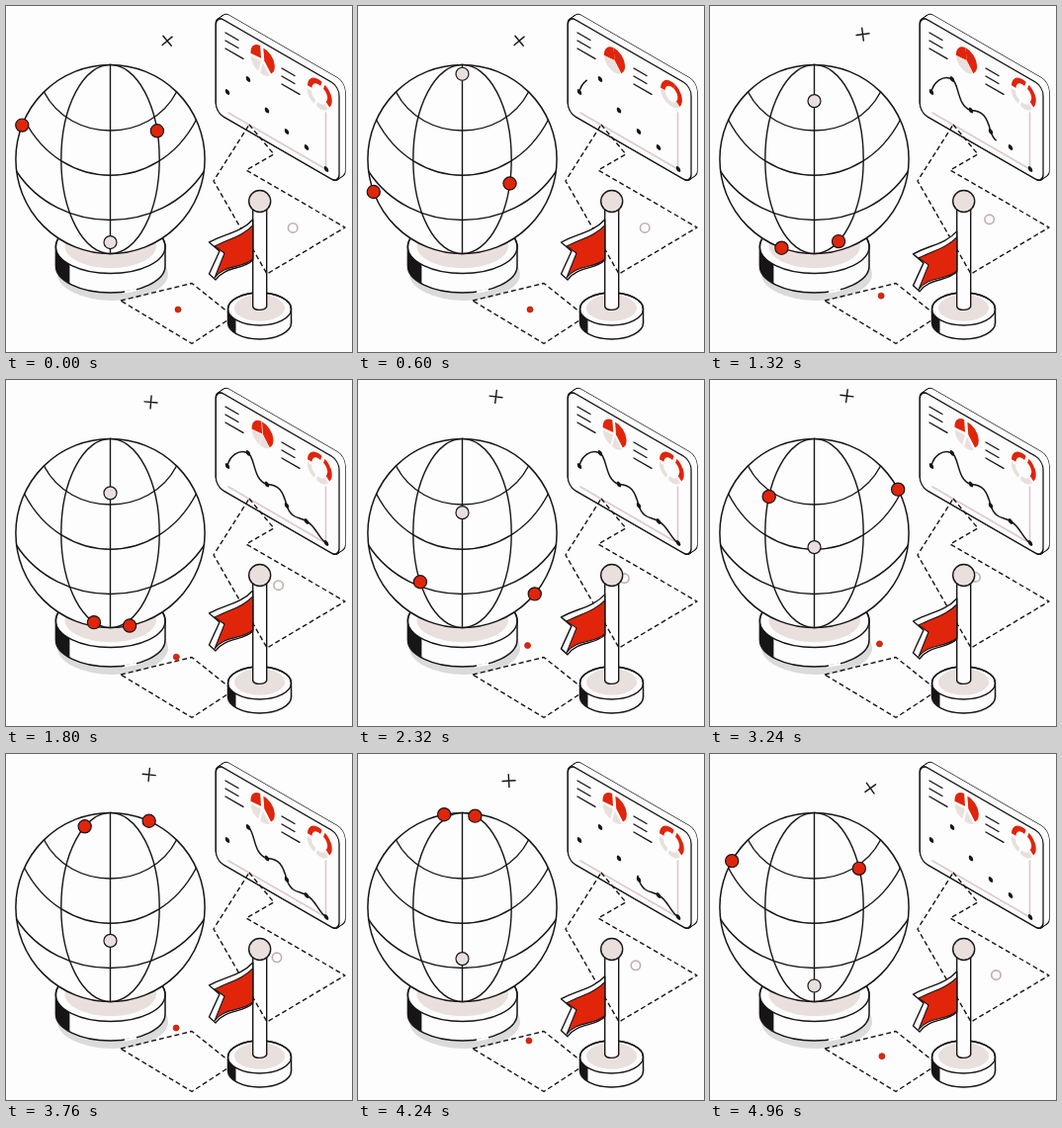
An HTML page with a canvas that plays this animation: 350 by 350 pixels, repeating every 5 s.

```html
<!DOCTYPE html>
<html lang="en">
<head>
<meta charset="utf-8">
<title>Globe, chart and flag</title>
<style>
html, body { margin: 0; width: 100%; height: 100%; overflow: hidden; background: #fdfdfd; }
canvas { display: block; width: 350px; height: 350px; }
</style>
</head>
<body>
<canvas width="350" height="350"></canvas>
<script>
const ctx = document.querySelector('canvas').getContext('2d');
const INK = '#171515', RED = '#e0250b', PALE = '#e9dfdd', PAPER = '#fdfdfd', SHADE = '#dcdbdb', ROSE = '#c3adac';
const LOOP = 5000, CYCLE = 5080, TAU = Math.PI * 2;
const GLOBE = { x: 105.5, y: 155, r: 95.6, rx: 49.7 };

const clamp = v => Math.max(0, Math.min(1, v));
const smooth = (t, from, to) => { const u = clamp((t - from) / (to - from)); return u * u * (3 - 2 * u); };
const wrap = v => ((v % CYCLE) + CYCLE) % CYCLE;
const wave = (t, times) => Math.cos(TAU * times * (t - 300) / CYCLE);

function paint(path, fill, stroke, width = 1.4) {
  if (fill) { ctx.fillStyle = fill; ctx.fill(path); }
  if (stroke) { ctx.strokeStyle = stroke; ctx.lineWidth = width; ctx.stroke(path); }
}
function ellipse(x, y, rx, ry, fill, stroke, width) {
  const p = new Path2D();
  p.ellipse(x, y, rx, ry, 0, 0, TAU);
  paint(p, fill, stroke, width);
}
const disc = (x, y, r, fill, stroke, width) => ellipse(x, y, r, r, fill, stroke, width);
const shape = (d, fill, stroke, width) => paint(new Path2D(d), fill, stroke, width);

// Top-to-bottom half ellipse, sampled by distance travelled; side is -1 or 1.
function halfEllipse(rx, side) {
  const points = [], lengths = [0], steps = 180;
  for (let i = 0; i <= steps; i++) {
    const a = Math.PI * i / steps;
    points.push([GLOBE.x + side * rx * Math.sin(a), GLOBE.y - GLOBE.r * Math.cos(a)]);
    if (i) lengths.push(lengths[i - 1] + Math.hypot(points[i][0] - points[i - 1][0], points[i][1] - points[i - 1][1]));
  }
  return u => {
    const goal = clamp(u) * lengths[steps];
    let i = 1;
    while (i < steps && lengths[i] < goal) i++;
    const k = (goal - lengths[i - 1]) / (lengths[i] - lengths[i - 1]);
    return points[i].map((v, n) => points[i - 1][n] + (v - points[i - 1][n]) * k);
  };
}

// Goes down one line from `top` until `bottom`, then back up the other.
function orbit(t, top, bottom, down, up) {
  const fall = wrap(bottom - top), elapsed = wrap(t - top);
  return elapsed < fall ? down(elapsed / fall) : up(1 - (elapsed - fall) / (CYCLE - fall));
}
const leftRim = halfEllipse(GLOBE.r, -1), leftArc = halfEllipse(GLOBE.rx, -1);
const rightRim = halfEllipse(GLOBE.r, 1), rightArc = halfEllipse(GLOBE.rx, 1);

const chartPath = 'M224 87C226 77 236 69 245 74C252 78 250 102 264 105.5C276 106 280 112 284 127C289 142 298 138 304 143C313 147 316 160 324 165';
const chartDots = [[224, 87], [245, 74], [264, 105.5], [284, 127], [304, 143], [324, 165]];
const measure = document.createElementNS('http://www.w3.org/2000/svg', 'path');
measure.setAttribute('d', chartPath);
const chartLength = measure.getTotalLength();

function onPanel(x, y, draw) {
  ctx.save();
  ctx.transform(0.866, 0.5, 0, 1, x, y);
  draw();
  ctx.restore();
}

function wedges(x, y, outer, inner, gap, parts) {
  onPanel(x, y, () => {
    for (const [from, to, color] of parts) {
      const a = from * Math.PI / 180, b = to * Math.PI / 180, mid = (a + b) / 2;
      const dx = Math.cos(mid) * gap, dy = Math.sin(mid) * gap, p = new Path2D();
      p.arc(dx, dy, outer, a, b);
      if (inner) p.arc(dx, dy, inner, b, a, true);
      else p.lineTo(dx, dy);
      p.closePath();
      paint(p, color);
    }
  });
}

function textLines(x, y) {
  [13, 13, 18].forEach((w, i) => shape(`M${x} ${y + i * 8}l${w} ${w * 0.577}`, null, INK, 1.4));
}

function panel(t) {
  const front = new Path2D(), x = 212.3, y = 9.5;
  front.roundRect(0, 0, 144, 98, 9);
  const slab = draw => {
    for (let i = 6; i >= 0; i--) onPanel(x + i, y - i * 0.7, draw);
  };
  slab(() => paint(front, null, INK, 1.6));
  slab(() => paint(front, PAPER));
  onPanel(x, y, () => paint(front, PAPER, INK, 1.5));

  textLines(222, 27);
  textLines(279, 63);
  shape('M225 108L323.5 165V108', null, '#dccbc9', 1.7);

  const pieGap = 2.2 * (1 - smooth(t, 0, 500) + smooth(t, 1450, 2600));
  const ringGap = 2.2 * (1 - smooth(t, 0, 500) + smooth(t, 750, 1350));
  wedges(259.5, 55, 12.2, 0, pieGap, [[175, 265, RED], [265, 410, RED], [50, 105, PALE], [105, 175, PALE]]);
  wedges(317, 89, 12.6, 7.4, ringGap, [[180, 290, RED], [290, 400, RED], [40, 110, PALE], [110, 180, PALE]]);

  const start = chartLength * smooth(t, 3300, 4950), end = chartLength * smooth(t, 300, 1900);
  if (end - start > 0.5) {
    ctx.setLineDash([0, start, end - start, chartLength * 2]);
    ctx.lineCap = 'butt';
    shape(chartPath, null, INK, 1.5);
    ctx.setLineDash([]);
    ctx.lineCap = 'round';
  }
  for (const [dotX, dotY] of chartDots) onPanel(dotX, dotY, () => disc(0, 0, 2.6, INK));
}

function dashed(d) {
  ctx.save();
  ctx.lineCap = 'butt';
  ctx.setLineDash([5, 3]);
  shape(d, null, INK, 1.4);
  ctx.restore();
}

// Drum with an inner pad and a dark band on its left side.
function drum(x, y, rx, ry, height, band, pad) {
  const body = new Path2D();
  body.ellipse(x, y, rx, ry, 0, Math.PI, TAU);
  body.lineTo(x + rx, y + height);
  body.ellipse(x, y + height, rx, ry, 0, 0, Math.PI);
  body.closePath();
  paint(body, PAPER);
  ctx.save();
  ctx.clip(body);
  ctx.fillStyle = INK;
  ctx.fillRect(x - rx, y, band, height + ry);
  ctx.restore();
  ellipse(x, y, rx, ry, PAPER, INK, 1.4);
  ellipse(x, y - 1, rx * pad, ry * pad, PALE);
  paint(body, null, INK, 1.5);
}

function globe(t) {
  ellipse(108, 271, 56, 27, SHADE);
  drum(105.7, 243.5, 55.3, 27, 19.5, 14, 0.84);
  shape('M121 289.3l10 -2', null, PAPER, 2.5);
  const { x, y, r, rx } = GLOBE;
  disc(x, y, r, PAPER, INK, 1.5);
  ellipse(x, y, rx, r, null, INK, 1.4);
  shape(`M${x} ${y - r}V${y + r}`, null, INK, 1.4);
  for (const [half, top, sag, pull] of [[67, 87, 52, 40], [87, 115, 75, 48], [95, 167, 66, 52]]) {
    shape(`M${x - half} ${top}C${x - pull} ${top + sag} ${x + pull} ${top + sag} ${x + half} ${top}`, null, INK, 1.4);
  }
  disc(x, y - r + 2.02 * r * wrap(t - 355) / CYCLE, 6.5, PALE, INK, 1.2);
  disc(...orbit(t, 4080, 1615, leftRim, leftArc), 6.6, RED, INK, 1.2);
  disc(...orbit(t, 4090, 1640, rightArc, rightRim), 6.6, RED, INK, 1.2);
}

function pole() {
  ellipse(258, 320, 32, 18, SHADE);
  drum(256.5, 306.5, 32, 16.5, 14, 8, 0.8);
  shape('M249.7 200V304C251 308.5 262 308.5 263.7 304V200Z', PAPER, INK, 1.4);
}

// The cloth slides up and down its pole.
function flag(t) {
  ctx.save();
  ctx.translate(0, 4.2 - 9.6 * wave(t, 3));
  shape('M249.7 216C238 229 222 230 205.5 239L216 248L205.5 271L212 277C222 263 240 267 249.7 257Z', PAPER, INK, 1.4);
  shape('M249.7 222C239 233 227 235 211 243L221 250L211 275C221 261 239 266 249.7 256Z', RED, INK, 1.1);
  ctx.restore();
  disc(256.7, 197.5, 11, PALE, INK, 1.4);
}

function cross(c) {
  const turn = 45 + 52 * (1 - ((c + 1) / 2) ** 3);
  ctx.save();
  ctx.translate(150.4 + 13.6 * c, 25.4 + 10.6 * c);
  ctx.rotate(turn * Math.PI / 180);
  shape('M-6.5 0H6.5M0 -6.5V6.5', null, INK, 1.4);
  ctx.restore();
}

function draw(t) {
  const sway = wave(t, 1);
  ctx.fillStyle = PAPER;
  ctx.fillRect(0, 0, 350, 350);
  ctx.lineCap = ctx.lineJoin = 'round';
  panel(t);
  cross(sway);
  globe(t);
  dashed('M116 298L188 280.5L230 314L188 341.5Z');
  disc(279 + 12 * sway, 211.6 + 13.8 * sway, 4.7, PAPER, ROSE, 1.6);
  pole();
  dashed('M246 120L271 150L243 166L343 224L264 271L210 177Z');
  disc(172.7 + 1.4 * sway, 286.4 + 22.2 * sway, 3, RED, '#a82a1b', 0.8);
  flag(t);
}

function frame() {
  draw(performance.now() % LOOP);
  requestAnimationFrame(frame);
}
frame();
</script>
</body>
</html>
```
